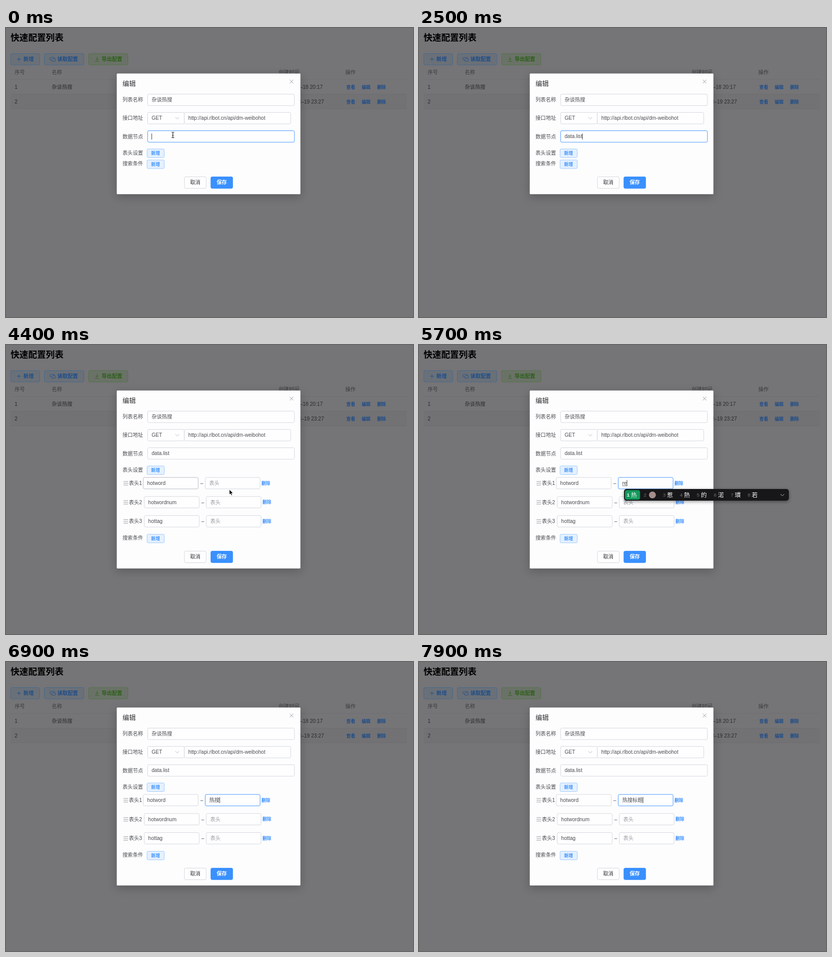
An HTML page that plays this animation: 800x570 px, repeating every 8 s.

```html
<!DOCTYPE html>
<html lang="zh-CN">
<head>
<meta charset="utf-8">
<title>快速配置列表</title>
<style>
html, body { margin: 0; width: 100%; height: 100%; overflow: hidden; background: #757477; }
svg { display: block; width: 800px; height: 570px; }
text { font-family: "Liberation Sans", "Noto Sans CJK SC", "Noto Sans CJK", sans-serif; white-space: pre; }
.dialog { filter: drop-shadow(0 5px 9px rgba(0, 0, 0, .22)); }
.bar { filter: drop-shadow(0 2px 3px rgba(0, 0, 0, .4)); }
</style>
</head>
<body>
<svg viewBox="0 0 800 570"><g id="page"></g><g id="live"></g></svg>
<script>
const LOOP = 8000, STEP = 100, SIZE = 10.11, SMALL = 8.67;
const INK = '#4c4e52', BLUE = '#3990fe', LINE = '#d3d5db', HINT = '#9b9da3';
const DIM_BLUE = '#1d4c88', DIM_INK = '#2b2c2f';
const EXPAND = 3700, BLUR = 3300, FOCUS = 4900;

const pen = document.createElement('canvas').getContext('2d');
pen.font = `${SIZE}px "Liberation Sans", "Noto Sans CJK SC", "Noto Sans CJK", sans-serif`;
const widthOf = s => pen.measureText(s).width;

// y is the vertical middle of the glyphs
const text = (s, x, y, fill = INK, size = SIZE, more = '') =>
  `<text x="${x}" y="${y + size * .36}" fill="${fill}" font-size="${size}" ${more}>${s}</text>`;
const bold = (s, x, y, fill, size = SIZE) => text(s, x, y, fill, size, 'font-weight="700"');
const rect = (x, y, w, h, fill, stroke = 'none', r = 2.5) =>
  `<rect x="${x}" y="${y}" width="${w}" height="${h}" rx="${r}" fill="${fill}" stroke="${stroke}" stroke-width=".9"/>`;
const path = (d, stroke, width = .8, fill = 'none') =>
  `<path d="${d}" stroke="${stroke}" stroke-width="${width}" fill="${fill}"/>`;
const input = (x, y, w, value, stroke = LINE, fill = INK) =>
  rect(x, y, w, 22.6, '#fefeff', stroke) + text(value, x + 7.8, y + 11.2, fill);
const addButton = y => rect(277.3, y, 33.8, 16.8, '#e5f1ff', '#9ac8fb', 2) +
  bold('新增', 285.3, y + 8.4, BLUE, SMALL);
const caretAt = (x, y) => rect(x, y - 6, .9, 12, '#333', 'none', 0);

function page() {
  const button = (x, w, label, tx, fill, edge, ink) =>
    rect(x, 50.5, w, 22.3, fill, edge) + bold(label, tx, 61.5, ink);
  const row = (y, n, name, date, end) =>
    text(n, 17, y, DIM_INK) + text(name, 90, y, DIM_INK) +
    text(date, end, y, DIM_INK, SIZE, 'text-anchor="end"') +
    ['查看', '编辑', '删除'].map((s, i) => bold(s, 669 + i * 30.2, y + .6, DIM_BLUE, SMALL)).join('');
  return rect(0, 0, 800, 570, '#757477', 'none', 0) +
    bold('快速配置列表', 9, 19, '#000', 17.33) +
    button(9.4, 56.8, '新增', 34.3, '#6a7078', '#436990', DIM_BLUE) +
    button(75.5, 77.4, '读取配置', 101, '#6a7078', '#436990', DIM_BLUE) +
    button(162.4, 77, '导出配置', 188, '#6a7267', '#517443', '#2c5f18') +
    path('M21.5 61.5h8M25.5 57.5v8', DIM_BLUE) +
    path('M90 63h-1.5a1.5 1.5 0 0 1 0-5h5a1.5 1.5 0 0 1 2 2M91 60.500h4a2 2 0 0 1 0 5h-3a2 2 0 0 1-1-4', DIM_BLUE) +
    path('M179 57v6M176.500 60.700l2.500 2.500 2.500-2.500M175 65.700h8', '#2c5f18') +
    rect(9, 131, 779, 28, '#727174', 'none', 0) +
    path('M9 101.300h779M9 130.500h779M9 159.500h779', '#6c6b6e', .7) +
    [['序号', 17], ['名称', 90], ['创建时间', 536], ['操作', 667]]
      .map(([s, x]) => text(s, x, 87.3, '#3b3c3f')).join('') +
    row(116, '1', '杂谈热搜', '2022–02–18 20:17', 622.5) +
    row(145, '2', '', '2022–02–19 23:27', 625);
}

// [time, committed text, text being composed, candidates]
const nodeKeys = [[0, ''], [1000, 'd'], [1100, 'da'], [1200, 'dat'], [1300, 'data'], [1800, 'data.'],
  [2000, 'data.l'], [2100, 'data.li'], [2200, 'data.lis'], [2400, 'data.list']];
const headKeys = [
  [FOCUS, '', ''],
  [5500, '', 'r', '人 让 如 日 热 入 然 若'],
  [5600, '', 're', '热 ● 惹 熱 的 渃 瑻 若'],
  [5900, '', 're\'s', '热水 热 ● 惹 熱 渃 若'],
  [6000, '', 're\'so', '热搜 热 ● 惹 熱 渃 若'],
  [6100, '', 're\'sou', '热搜 热 ● 惹 熱 渃 若'],
  [6500, '热搜', ''],
  [7200, '热搜', 'b', '不 吧 把 被 比 本 并 别'],
  [7300, '热搜', 'bia', '表 标 彪 镖 膘 飙 裱 婊'],
  [7400, '热搜', 'biao', '表 标 彪 镖 膘 飙 裱 婊'],
  [7500, '热搜', 'biao\'t', '标题 表态 标 表 彪 镖'],
  [7600, '热搜', 'biao\'ti', '标题 表题 标 表 彪 镖'],
  [7700, '热搜标题', '']];
const latest = (keys, t) => keys.filter(k => k[0] <= t).pop();
const blink = (t, since) => (t - since) % 1000 < 500;

function candidateBar(x, words) {
  let s = rect(x, 284, 324, 23, '#171719', 'none', 5), at = x + 5.5;
  words.split(' ').forEach((word, i) => {
    const span = word.length * 11.7;
    if (!i) s += rect(x + 1.8, 286.2, 18 + span, 18.8, '#129a5b', 'none', 4);
    s += text(i + 1, at, 295.7, i ? '#737376' : '#fff', 9.5, i ? '' : 'font-weight="700"');
    s += word === '●' ? `<circle cx="${at + 17}" cy="295.700" r="6.800" fill="#a58f8b"/>`
      : text(word, at + 8, 295.5, '#f4f4f4', 11.7);
    at += word === '●' ? 37.7 : 21.6 + span;
  });
  return `<g class="bar">${s}</g>` + path(`M${x + 307.5} 294l3.700 3.700 3.700-3.700`, '#bbb', 1);
}

function headerRows(t) {
  const [since, done, comp, words] = latest(headKeys, t) || [0, '', ''];
  const focused = t >= FOCUS, value = done + comp;
  let s = ['hotword', 'hotwordnum', 'hottag'].map((key, i) => {
    const y = 261.2 + i * 37.6, mid = y + 11.2, dx = i ? 2 : 0;
    const hover = !i && t >= 3900 && t <= 4400;
    const typed = !i && value;
    return path([-3.2, .3, 3.8].map(d => `M231 ${mid + d}h9`).join(''), '#85878b', .8) +
      text('表头' + (i + 1), 241.5, mid) +
      input(269.8 + dx, y, 108, key, hover ? '#b4b6bb' : LINE) +
      text('–', 382 + dx, mid) +
      input(391.6 + dx, y, 107.8, typed || '表头', !i && focused ? BLUE : LINE, typed ? INK : HINT) +
      bold('删除', 502 + dx, mid, BLUE, SMALL);
  }).join('');
  const start = 399.4 + widthOf(done), end = 399.4 + widthOf(value);
  if (comp) s += path(`M${start} 277.700H${end}`, INK, .8);
  if (focused && blink(t, since)) s += caretAt(end, 272.3);
  if (words) s += candidateBar(done ? 423 : 403, words);
  return s;
}

function dialog(t) {
  const open = t >= EXPAND, dy = open ? 113 : 0;
  const [since, value] = latest(nodeKeys, t), focused = t < BLUR;
  let s = `<g class="dialog">${rect(217.7, 89.8, 361, 238 + dy, '#fdfdfe', 'none', 1.5)}</g>` +
    text('编辑', 229, 109.5, '#303133', 13) +
    path('M557.700 102l7.200 7.200M564.900 102l-7.200 7.200', '#85878c') +
    [['列表名称', 141.5], ['接口地址', 177.7], ['数据节点', 214], ['表头设置', 246], ['搜索条件', 267.6 + dy]]
      .map(([label, y]) => text(label, 229, y)).join('') +
    input(278.4, 130.4, 288.5, '杂谈热搜') +
    input(278.4, 166.5, 72, 'GET') + path('M333 176l3.700 3.500 3.700-3.500', '#a8abb2') +
    input(350.5, 166.5, 209.2, 'http://api.rlbot.cn/api/dm-weibohot') +
    input(278.4, 202.6, 288.5, value, focused ? BLUE : LINE) +
    addButton(238.6) + addButton(260.3 + dy) +
    rect(350.7, 293.5 + dy, 42.8, 22.8, '#fefeff', LINE) + text('取消', 362, 304.7 + dy, '#303133') +
    rect(402.7, 293.5 + dy, 42.9, 22.8, BLUE, BLUE) + bold('保存', 414, 304.7 + dy, '#fff');
  if (focused && blink(t, since)) s += caretAt(286 + widthOf(value), 214);
  if (t >= 800 && t < 1700)
    s += rect(286, 225.3, 19.2, 19, '#2b2b2d', 'none', 4.5) + text('英', 290, 234.8, '#fff', 11.2);
  return s + (open ? headerRows(t) : '');
}

const track = [[0, 328, 211], [2800, 328, 211], [3300, 360, 254], [3800, 360, 254],
  [4100, 372, 275], [4400, 439, 285], [4800, 430, 273], [LOOP, 430, 273]];

function cursor(t) {
  if ((t >= 1000 && t < 2800) || t >= 5500) return '';
  const i = track.findIndex(k => k[0] > t), [t0, x0, y0] = track[i - 1], [t1, x1, y1] = track[i];
  const p = (t - t0) / (t1 - t0), k = p * p * (3 - 2 * p);
  const x = x0 + (x1 - x0) * k, y = y0 + (y1 - y0) * k;
  const overInput = (y > 202 && y < 225) ||
    (t >= EXPAND && y > 261 && y < 284 && (x < 378 || x > 391));
  const shape = overInput
    ? path('M-2.500-5.500q2.500 0 2.500 1.500q0-1.500 2.500-1.500M0-4v8M-2.500 5.500q2.500 0 2.500-1.500q0 1.500 2.500 1.500M-1.300.900h2.600', '#222', 1.1)
    : path('M0 0v10.200l2.300-2.100 1.700 3.700 1.800-.800-1.700-3.600h3.300z', '#fff', .8, '#000');
  return `<g transform="translate(${x} ${y})">${shape}</g>`;
}

const live = document.getElementById('live');
document.getElementById('page').innerHTML = page();
let shown = -1;
function frame() {
  const t = Math.floor(performance.now() % LOOP / STEP) * STEP;
  if (t !== shown) live.innerHTML = dialog(t) + cursor(t);
  shown = t;
  requestAnimationFrame(frame);
}
frame();
</script>
</body>
</html>
```
